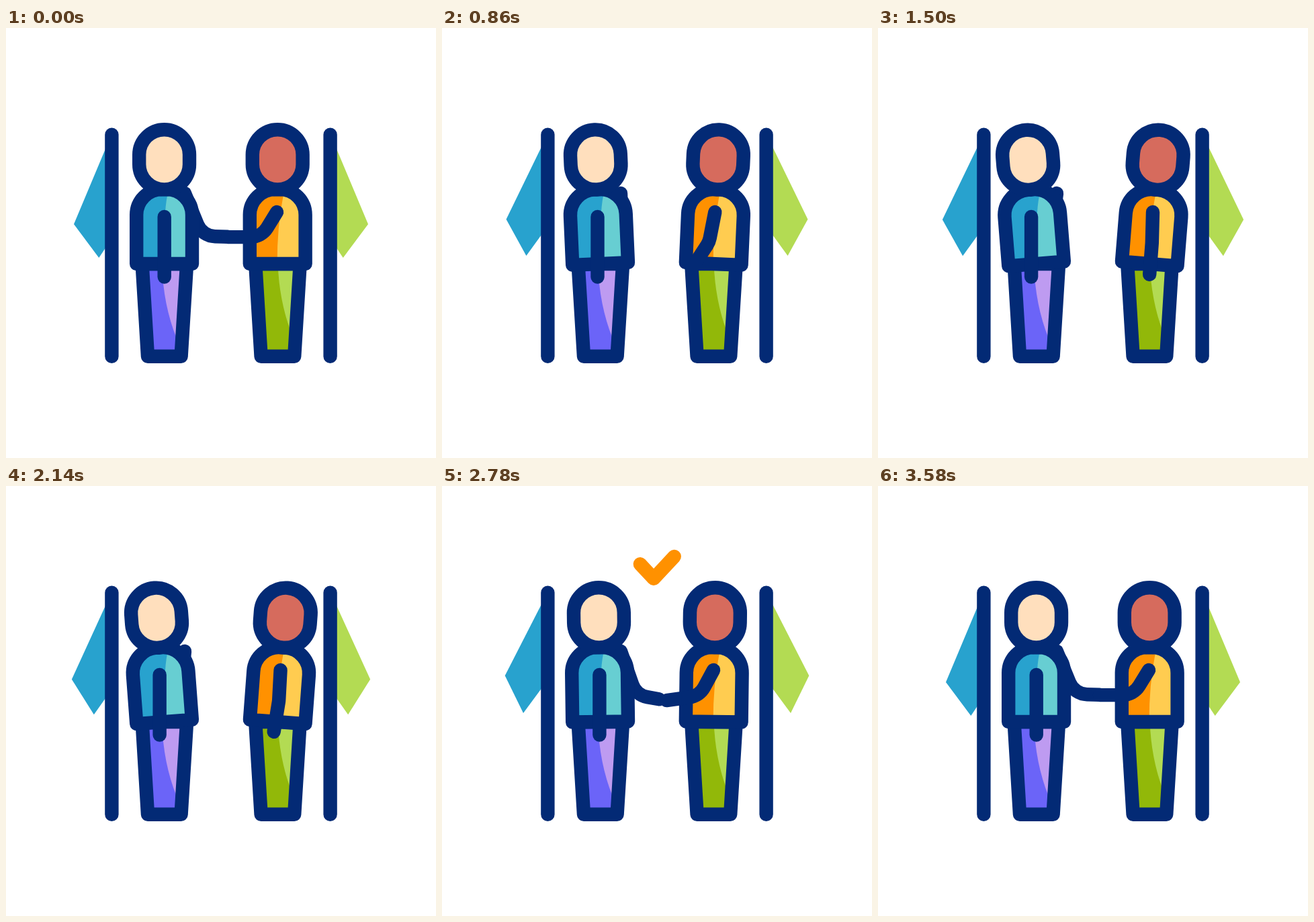
Animation, 640 px wide and 640 px high, one loop 3600 ms. Source, as an HTML page with a canvas:

```html
<!DOCTYPE html>
<html lang="en">
<head>
<meta charset="utf-8">
<title>Agreement</title>
<style>
  html, body { margin: 0; width: 100%; height: 100%; overflow: hidden; background: #fff; }
  canvas { display: block; width: 640px; height: 640px; }
</style>
</head>
<body>
<canvas id="stage"></canvas>
<script>
const LOOP = 3600, SWING = 1187, LINE = 20.4;
const NAVY = '#032a75', ORANGE = '#ff9100', BLUE = '#28a2ce', LIME = '#b3db53';
const RAD = Math.PI / 180;
const MID = 235.7, WAIST = 351; // pivot of the left person
const GAP = 168.6;              // distance between the two people

const canvas = document.getElementById('stage');
const ctx = canvas.getContext('2d');
const dpr = window.devicePixelRatio || 1;
canvas.width = canvas.height = 640 * dpr;
ctx.lineCap = ctx.lineJoin = 'round';

const PEOPLE = [
  { x: 0, dir: -1, skin: '#ffdfbd', shirt: [BLUE, '#67ced2'], legs: ['#6b64f8', '#be9bf1'],
    fold: [240, 250, 235, 272, 235, 351], crease: [232, 351, 234, 413, 254, 462] },
  { x: GAP, dir: 1, skin: '#d66b5d', shirt: [ORANGE, '#ffcc50'], legs: ['#92b809', LIME],
    fold: [244, 250, 235, 295, 235, 351], crease: [236, 351, 238, 405, 255, 451] }
];

const lerp = (a, b, k) => a + (b - a) * k;
const ease = k => (1 - Math.cos(Math.PI * Math.min(1, Math.max(0, k)))) / 2;
const ramp = (t, from, to) => ease((t - from) / (to - from));

function poly(...points) {
  const p = new Path2D();
  points.forEach(([x, y]) => p.lineTo(x, y));
  return p;
}

function closed(...points) {
  const p = poly(...points);
  p.closePath();
  return p;
}

function fill(path, color) {
  ctx.fillStyle = color;
  ctx.fill(path);
}

function stroke(path, color = NAVY) {
  ctx.strokeStyle = color;
  ctx.lineWidth = LINE;
  ctx.stroke(path);
}

// Everything to the right of a curve
function rightOf([x0, y0, cx, cy, x1, y1]) {
  const p = poly([320, y1], [320, y0 - 20], [x0, y0 - 20], [x0, y0]);
  p.quadraticCurveTo(cx, cy, x1, y1);
  return p;
}

function bodyShape(left, right, top, bottom, r) {
  const p = new Path2D();
  p.moveTo(left, bottom);
  p.arcTo(left, top, MID, top, r);
  p.arcTo(right, top, right, bottom, r);
  p.lineTo(right, bottom);
  p.closePath();
  return p;
}

const LEGS = closed([202.6, WAIST], [211, 488.8], [260.6, 488.8], [269.1, WAIST]);
const TORSO = bodyShape(194.2, 277, 240.1, WAIST, 38);
const HEAD = new Path2D();
HEAD.roundRect(198.2, 151.2, 74.8, 89.2, 37.4);

function twoTone(shape, [dark, light], edge, turn) {
  ctx.save();
  turn(1);
  fill(shape, dark);
  ctx.clip(shape);
  turn(-1); // the shading stays upright while the shape leans
  fill(rightOf(edge), light);
  ctx.restore();
}

function drawPerson(who, lean) {
  const turn = sign => {
    ctx.translate(MID, WAIST);
    ctx.rotate(sign * who.dir * lean * 4.6 * RAD);
    ctx.translate(-MID, -WAIST);
  };
  ctx.save();
  ctx.translate(who.x, 0);
  twoTone(LEGS, who.legs, who.crease, () => {});
  stroke(LEGS);
  twoTone(TORSO, who.shirt, who.fold, turn);
  turn(1);
  stroke(TORSO);
  fill(HEAD, who.skin);
  stroke(HEAD);
  ctx.restore();
}

// Arm hanging from a shoulder; the elbow turns about half as far as the hand
function drawArm(x, y, dir, angle, upper, reach) {
  const at = (deg, r) => [x + dir * r * Math.sin(deg * RAD), y + r * Math.cos(deg * RAD)];
  const hand = at(angle, reach);
  const p = poly([x, y]);
  p.arcTo(...at(angle * .5, upper), ...hand, 29);
  p.lineTo(...hand);
  stroke(p);
}

function drawFlag(color, k) {
  fill(closed(
    [157, 158.5],
    [lerp(101, 91.6, k), lerp(292, 279.5, k)],
    [lerp(138.3, 116, k), lerp(342, 337, k)],
    [157, lerp(314, 282, k)]
  ), color);
  stroke(poly([157.4, 158.8], [157.4, 488.8]));
}

function drawCheck(t) {
  const size = 1.27 * ramp(t, 2345, 2970) * (1 - ramp(t, 3250, 3540));
  if (size < .005) return;
  ctx.save();
  ctx.translate(320.3, 121.5);
  ctx.scale(size, size);
  stroke(poly([-25.3, -5.3], [-5.2, 16.3], [25.3, -16.5]), ORANGE);
  ctx.restore();
}

function draw(t) {
  const lean = ramp(t, 250, 1396) - ramp(t, 1945, 3092);
  const drop = ramp(t, 360, 1172) - ramp(t, 1995, 2983);
  const swing = ease(2 * Math.min(t, 3 * SWING) / SWING % 2 > 1
    ? 2 - 2 * t / SWING % 2
    : 2 * Math.min(t, 3 * SWING) / SWING % 2);

  ctx.setTransform(dpr, 0, 0, dpr, 0, 0);
  ctx.fillStyle = '#fff';
  ctx.fillRect(0, 0, 640, 640);

  drawFlag(BLUE, swing);
  ctx.save();
  ctx.translate(640, 0);
  ctx.scale(-1, 1);
  drawFlag(LIME, swing);
  ctx.restore();

  drawArm(266, 246, 1, lerp(44.6, -15, drop), 69, lerp(91, 94, drop));
  PEOPLE.forEach(who => drawPerson(who, lean));
  const sleeve = MID - 7.6 * lean;
  stroke(poly([sleeve, 281], [sleeve, 370.6]));
  drawArm(403 + 6 * lean, 274, -1, lerp(63.1, 3, drop), lerp(43.5, 46, drop), lerp(82, 93, drop));
  drawCheck(t);
}

const start = performance.now();
function tick() {
  draw((performance.now() - start) % LOOP);
  requestAnimationFrame(tick);
}
tick();
</script>
</body>
</html>
```
